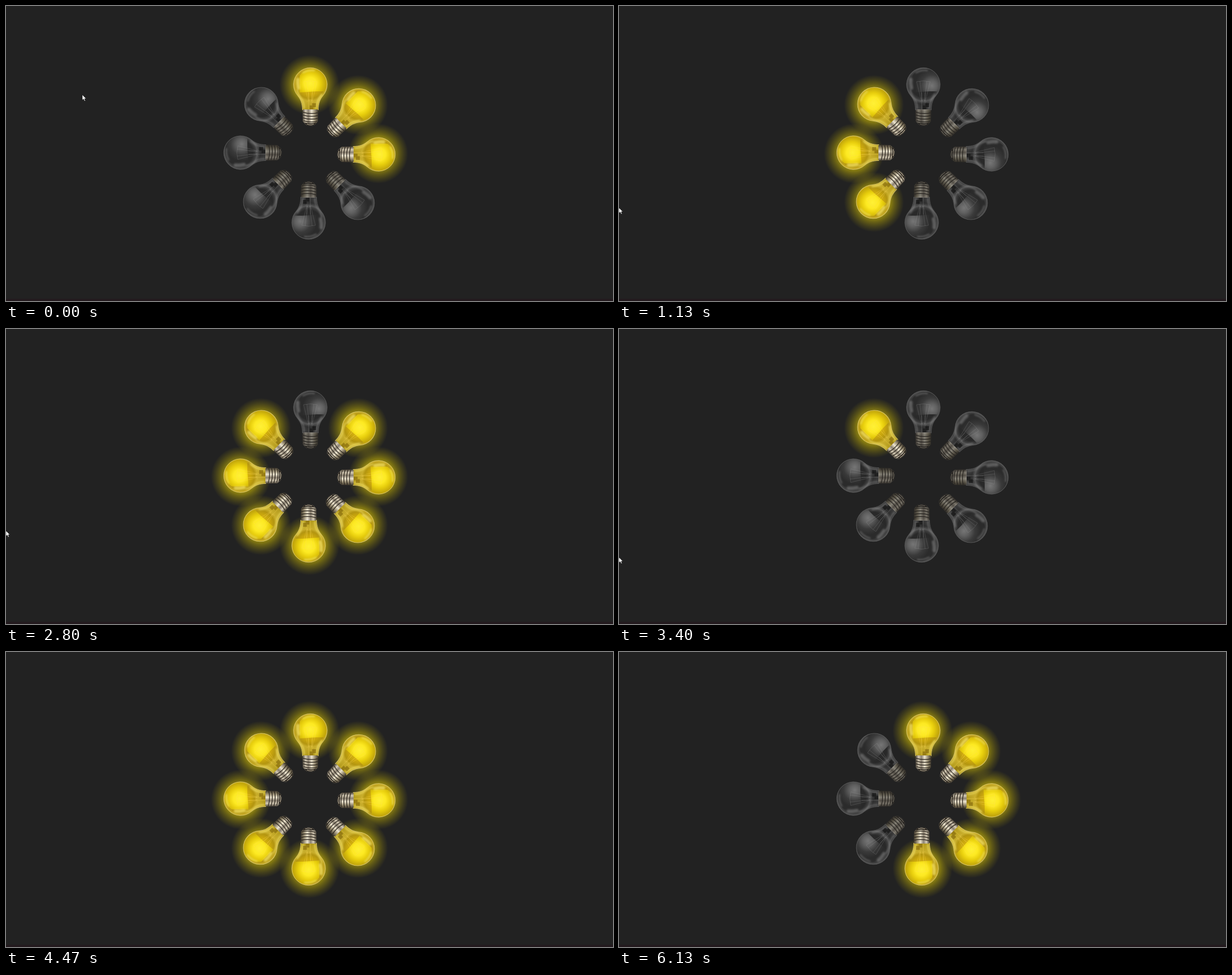
These frames come from a looping animation (1074x522 px, 6190 ms). An HTML page:

```html
<!DOCTYPE html>
<html lang="en">
<head>
<meta charset="utf-8">
<title>Ring of light bulbs</title>
<style>
  html, body { margin: 0; width: 100%; height: 100%; overflow: hidden; background: #222; }
  svg { display: block; width: 1074px; height: 522px; }
</style>
</head>
<body>
<svg viewBox="0 0 1074 522">
  <defs>
    <radialGradient id="glowFill">
      <stop offset="0" stop-color="#ffe600" stop-opacity=".95"/>
      <stop offset=".56" stop-color="#e6d000" stop-opacity=".52"/>
      <stop offset=".7" stop-color="#d8c400" stop-opacity=".34"/>
      <stop offset=".85" stop-color="#d0bc00" stop-opacity=".16"/>
      <stop offset="1" stop-color="#d0bc00" stop-opacity="0"/>
    </radialGradient>
    <radialGradient id="litGlass" gradientUnits="userSpaceOnUse" cx="0" cy="0" r="46">
      <stop offset="0" stop-color="#e6c410"/>
      <stop offset=".4" stop-color="#c9a60e"/>
      <stop offset=".54" stop-color="#b39510"/>
      <stop offset=".64" stop-color="#c9ae2c"/>
      <stop offset="1" stop-color="#b0981c"/>
    </radialGradient>
    <radialGradient id="litShine" gradientUnits="userSpaceOnUse" cx="0" cy="-2" r="27">
      <stop offset="0" stop-color="#fff036"/>
      <stop offset=".4" stop-color="#fde922"/>
      <stop offset=".7" stop-color="#e6cc0c"/>
      <stop offset="1" stop-color="#c4a80c"/>
    </radialGradient>
    <radialGradient id="darkGlass" gradientUnits="userSpaceOnUse" cx="0" cy="0" r="46">
      <stop offset="0" stop-color="#2b2b2b"/>
      <stop offset=".48" stop-color="#292929"/>
      <stop offset=".58" stop-color="#3c3c3c"/>
      <stop offset=".64" stop-color="#555"/>
      <stop offset=".75" stop-color="#303030"/>
      <stop offset="1" stop-color="#3c3c3c"/>
    </radialGradient>
    <radialGradient id="darkShine" gradientUnits="userSpaceOnUse" cx="15" cy="2" r="30">
      <stop offset="0" stop-color="#767676"/>
      <stop offset=".3" stop-color="#606060"/>
      <stop offset=".65" stop-color="#3a3a3a"/>
      <stop offset="1" stop-color="#2b2b2b"/>
    </radialGradient>
    <linearGradient id="metal">
      <stop offset="0" stop-color="#453e34"/>
      <stop offset=".2" stop-color="#d6ccb6"/>
      <stop offset=".38" stop-color="#8a8070"/>
      <stop offset=".58" stop-color="#eee6d0"/>
      <stop offset=".8" stop-color="#94896f"/>
      <stop offset="1" stop-color="#3a342a"/>
    </linearGradient>
    <filter id="soft" x="-50%" y="-50%" width="200%" height="200%">
      <feGaussianBlur stdDeviation="1.6"/>
    </filter>

    <path id="glass" d="M-14 45C-14-0 33-14 33C-14 33-17 26-22 20" visibility="hidden"/>
    <path id="bulb" d="M-14 45C-14 33-17 26-22 20A29.7 29.7 0 1 1 22 20C17 26 14 33 14 45Z"/>
    <path id="shine" d="M-19-16A25.5 25.5 0 0 1 25 12L11 12Q-4 13-19 14Z"/>

    <g id="wires" fill="none" stroke-width=".7">
      <path d="M-12-5Q0-8 12-5M-12-5L-4 27M12-5L4 27M-6-6L-2 30M6-6L2 30"/>
      <path d="M-3 14V44M3 14V44M-6 30Q0 24 6 30"/>
    </g>
    <g id="streaks" fill="none" stroke-linecap="round" filter="url(#soft)">
      <path d="M-22-9Q-23-2-21 6" stroke-width="6"/>
      <path d="M-23 10Q-21 19-17 24Q-11 31-11 42" stroke-width="2.5"/>
      <path d="M-13-21Q-4-26 7-25" stroke-width="2.5"/>
      <path d="M20 18Q12 28 10 42" stroke-width="3"/>
    </g>

    <g id="socket">
      <path d="M-13 44H13L14 48L13.5 65L8 71Q0 74-8 71L-13.5 65L-14 48Z" fill="url(#metal)"/>
      <g fill="none" stroke="#28221b" stroke-opacity=".85" stroke-width="1.5">
        <path d="M-13 49Q0 53 13 50M-13 54Q0 58 13 55M-13 59Q0 63 13 60M-12 64Q0 68 12 65"/>
      </g>
      <path d="M-11 67Q0 70 11 67L8 71Q0 74-8 71Z" fill="#2a251f"/>
      <path d="M-6 70Q0 72 6 70" fill="none" stroke="#b8ad98" stroke-width="1.2"/>
    </g>
    <path id="mount" d="M3 33H10V40H5V44H-1V37H3Z"/>

    <g id="lit">
      <use href="#bulb" fill="url(#litGlass)"/>
      <use href="#shine" fill="url(#litShine)"/>
      <use href="#streaks" stroke="#fff27a" stroke-opacity=".6"/>
      <use href="#wires" stroke="#ffd95c" stroke-opacity=".4"/>
      <use href="#mount" fill="#7a5f08" opacity=".55"/>
      <use href="#bulb" fill="none" stroke="#e8d480" stroke-opacity=".75"/>
      <use href="#socket"/>
    </g>
    <g id="dark">
      <use href="#bulb" fill="url(#darkGlass)"/>
      <use href="#shine" fill="url(#darkShine)"/>
      <use href="#streaks" stroke="#aaa" stroke-opacity=".4"/>
      <use href="#wires" stroke="#aaa" stroke-opacity=".3"/>
      <use href="#mount" fill="#161616" opacity=".7"/>
      <use href="#bulb" fill="none" stroke="#606060" stroke-opacity=".75"/>
      <use href="#socket" opacity=".48"/>
    </g>
    <circle id="glow" cy="-121.5" r="53" fill="url(#glowFill)"/>
  </defs>

  <rect width="1074" height="522" fill="#222"/>
  <rect y="518" width="1074" height="4" fill="#231a1e"/>
  <g id="glows"></g>
  <g id="bulbs"></g>
  <path id="cursor" d="M0 0V9.6L2.2 7.6L3.8 11.2L5.4 10.5L3.9 7H6.8Z"
        fill="#fff" stroke="#111" stroke-width=".6"/>
</svg>
<script>
  const LOOP = 6190, CYCLE = 2000;
  const ON = [1730, 1870, 1930, 2070, 2130, 2270, 2330, 2470];
  const OFF = [2800, 2870, 2930, 3070, 3130, 3270, 3330, 3470];

  // Pointer stops: time, x, y; a stop without a place hides it.
  const POINTER = [
    [0, 135, 157], [70, 92, 205], [130, 40, 262], [200, 0, 310], [270],
    [600, 0, 357], [3000, 0, 380], [3400, 0, 404], [3530, 3, 425],
    [3600, 7, 446], [3670, 11, 468], [3800, 16, 490], [4000, 21, 511], [4130]
  ];

  const byId = id => document.getElementById(id);
  const cursor = byId('cursor');

  function addUse(parent, id, transform) {
    const use = document.createElementNS('http://www.w3.org/2000/svg', 'use');
    use.setAttribute('href', '#' + id);
    use.setAttribute('transform', transform);
    byId(parent).append(use);
    return use;
  }

  const bulbs = ON.map((_, i) => {
    const turn = `translate(537 261) rotate(${i * 45})`;
    const place = turn + ' translate(1.5 -122)';
    return {
      glow: addUse('glows', 'glow', turn),
      dark: addUse('bulbs', 'dark', place),
      lit: addUse('bulbs', 'lit', place)
    };
  });

  const show = (el, visible) => { el.style.display = visible ? '' : 'none'; };

  function isLit(i, t) {
    const age = (t - ON[i] + 2 * CYCLE) % CYCLE;
    return age < OFF[i] - ON[i];
  }

  function draw(t) {
    bulbs.forEach((bulb, i) => {
      const lit = isLit(i, t);
      show(bulb.glow, lit);
      show(bulb.lit, lit);
      show(bulb.dark, !lit);
    });
    const [, x, y] = POINTER.filter(stop => stop[0] <= t).pop();
    show(cursor, x !== undefined);
    if (x !== undefined) cursor.setAttribute('transform', `translate(${x} ${y})`);
  }

  const start = performance.now();
  function tick() {
    draw((performance.now() - start) % LOOP);
    requestAnimationFrame(tick);
  }
  tick();
</script>
</body>
</html>
```
